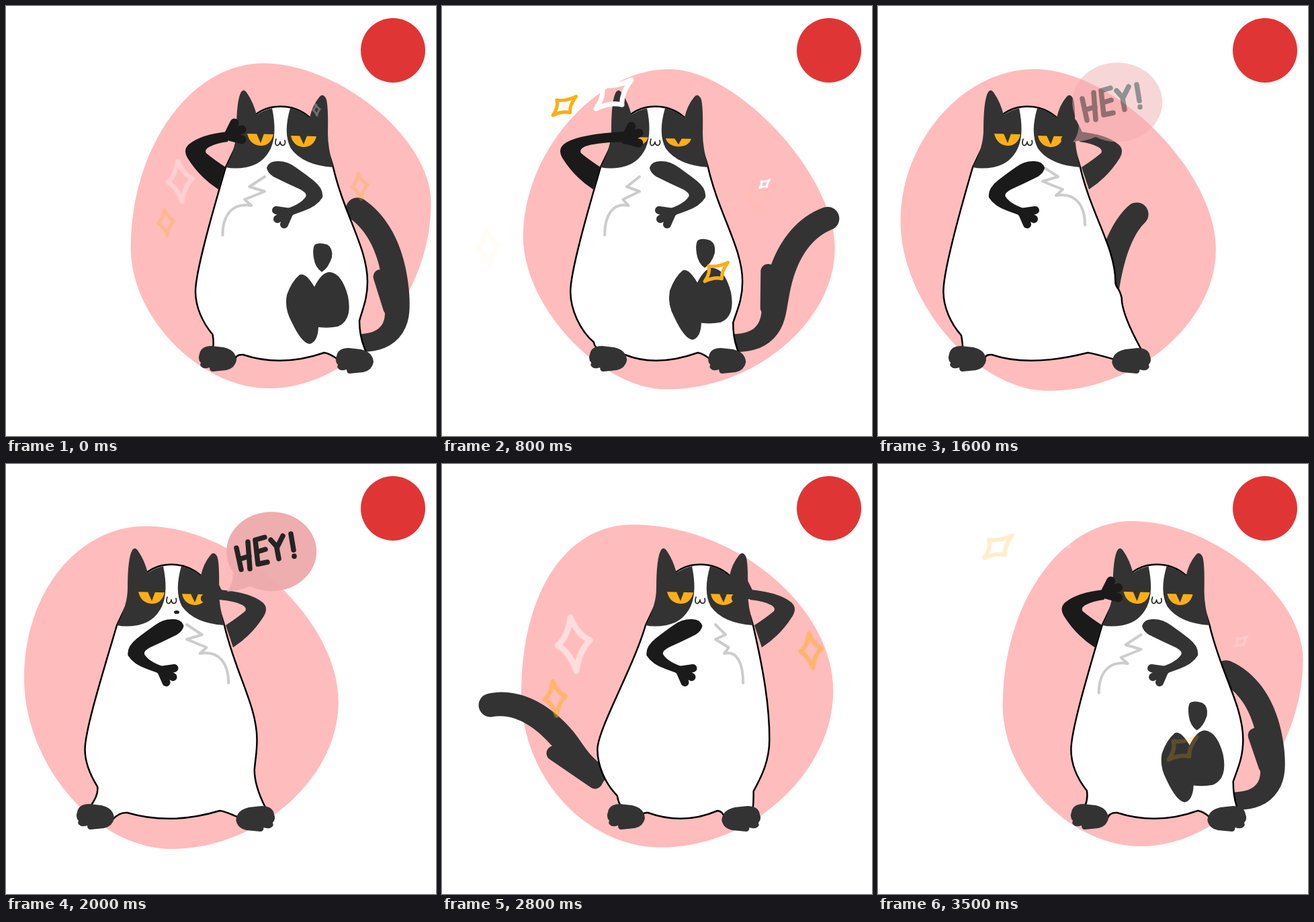
An HTML page for the animation above (3.6 s loop, 640 by 640 pixels).

```html
<!DOCTYPE html>
<html lang="en">
<head>
<meta charset="utf-8">
<title>Grooming cat</title>
<style>
  html, body { margin: 0; width: 100%; height: 100%; overflow: hidden; background: #fff; }
  svg { display: block; width: 100%; height: 100%; }
  .line { fill: none; stroke-linecap: round; stroke-linejoin: round; }
</style>
</head>
<body>
<svg viewBox="0 0 640 640">
  <defs><clipPath id="bodyClip"><path id="clipShape"/></clipPath></defs>
  <path id="blob" fill="#ffbcbd"/>
  <path id="tail" fill="#333"/>
  <path id="tuft" class="line" stroke="#333" stroke-width="22"/>
  <path id="body" fill="#fff" stroke="#000" stroke-width="2.5" stroke-linejoin="round"/>
  <g clip-path="url(#bodyClip)">
    <g id="spots" fill="#333">
      <path d="M459 356Q464 351 478 355Q487 360 485 374Q480 390 470 396Q460 389 458 375Q456 362 459 356Z"/>
      <path d="M437 400Q446 396 459 418Q470 396 482 396Q500 398 509 432Q516 468 494 477Q480 480 465 478Q464 500 452 503Q440 502 425 470Q414 450 418 430Q425 410 437 400Z"/>
    </g>
  </g>
  <g fill="#333">
    <path id="footL"/>
    <path id="footR"/>
  </g>
  <g id="head">
    <g fill="#333">
      <path d="M-81 240Q-65 210 -65 185Q-65 140 -58 128Q-54 122 -49 130Q-40 143 -35 162Q-22 154 -12 152Q-4 190 -14 212Q-25 235 -50 240Q-68 243 -81 240Z"/>
      <path d="M79 240Q71 210 71 190Q72 145 68 137Q63 129 58 136Q48 148 44 166Q32 156 15 152Q4 190 16 212Q34 237 79 240Z"/>
    </g>
    <g id="eyes">
      <path fill="#fbae17" d="M-49 190L-10 191Q-14 208 -29 208Q-45 207 -49 190ZM16 193L54 194Q50 210 34 210Q19 208 16 193Z"/>
      <path fill="#333" d="M-35 190H-24L-29 204ZM29 193H40L35 206Z"/>
    </g>
    <path class="line" stroke="#222" stroke-width="1.7" d="M-6 198C-10 210 -1 210 0 202C0 210 10 209 7 200"/>
    <ellipse id="talk" cx="8" cy="220.5" rx="4" ry="2.6" fill="#222"/>
  </g>
  <g id="limbs">
    <path id="fluff" class="line" stroke="#ccc" stroke-width="4"/>
    <g id="chestArm">
      <path stroke="none" d="M-15 241Q-12 231 0 231Q15 230 28 240Q45 252 55 260Q70 272 68 285Q60 298 40 305L18 313L10 303Q35 296 43 284Q46 279 35 273Q15 264 -5 254Q-14 248 -15 241Z"/>
      <path class="line" stroke-width="12" d="M20 307L-1 304M17 308L1 317M18 309L11 325"/>
    </g>
    <g id="headArm">
      <path id="sleeve" stroke="none"/>
      <path id="hand" class="line" stroke-width="13" d="M-78 194L-68 174M-76 190L-57 184M-76 194L-57 199"/>
    </g>
  </g>
  <g id="tall" class="line"></g>
  <g id="wide" class="line"></g>
  <g id="bubble" role="img" aria-label="HEY!">
    <path fill="#eeabad" d="M-57 30Q-57 48 -66 59Q-46 57 -32 51A67 59 0 1 0 -57 30Z"/>
    <path class="line" stroke="#1d1d1d" stroke-width="7.5" d="M-52 -6L-45 26M-35 -15L-32 25M-48 11L-33 6M-24 -18L-20 18L-6 15M-24 -18L-10 -22M-22 0L-9 -4M-1 -18L8 -8M17 -24L8 -6L11 10M29 -27L33 -3M34 6L34 6.5"/>
  </g>
  <circle cx="576" cy="66" r="48" fill="#e03535"/>
</svg>
<script>
const LOOP = 3600, STEP = 100;
const TURN = 1600, TURN_BACK = 3200;
const BLACK = '#1a1a1a', DARK = '#333', GOLD = '#fbae17';
const $ = id => document.getElementById(id);
const set = (id, attrs) => {
  for (const name in attrs) $(id).setAttribute(name, attrs[name]);
};

const mix = (a, b, k) => a + (b - a) * k;
const ramp = (t, a, b) => Math.max(0, Math.min(1, (t - a) / (b - a)));
const ease = (t, a, b) => { const u = ramp(t, a, b); return u * u * (3 - 2 * u); };
const easeOut = (t, a, b) => 1 - (1 - ramp(t, a, b)) ** 2;
const pulse = (t, peak, width) => Math.exp(-(((t - peak) / width) ** 2));

// Head position every 400 ms, joined by a closed Catmull-Rom curve.
const HEAD = [408, 368, 317, 253, 222, 246, 309, 384, 422];
function headX(t) {
  const i = Math.floor(t / 400), u = t / 400 - i;
  const [a, b, c, d] = [8, 0, 1, 2].map(k => HEAD[(i + k) % 9]);
  return b + .5 * u * (c - a + u * (2 * a - 5 * b + 4 * c - d + u * (3 * (b - c) + d - a)));
}
const lean = t => 30 * pulse(t, 1250, 200) - 28 * pulse(t, 2700, 450);
const bellyX = t => headX(t) - 126 + lean(t);
const footLeft = t => mix(286, 104, ease(t, 510, 1210) - ease(t, 2090, 3115));
const footRight = t => mix(490, 342, easeOut(t, 0, 2000) - ease(t, 2400, 3200));

// The blob rolls left and back: w is its position, v how it tumbles on the way.
function blobPath(t) {
  const low = 1885, high = 3550;
  const rising = t > low && t < high;
  const a = Math.PI * (rising ? (t - low) / (high - low) : 1 + ((t - high + LOOP) % LOOP) / (LOOP + low - high));
  const w = (1 - Math.cos(a)) / 2, v = -Math.sin(a), peak = w ** 4;
  const T = [mix(212, 381, w) + 26 * v, 93 - 8 * peak + 2 * v];
  const R = [mix(491, 632, w) + 10 * Math.abs(v), 357 - 66 * peak + 12 * v];
  const B = [mix(245, 391, w) + 3 * v, mix(573, 569, w)];
  const L = [mix(25, 186, w), mix(318, 360, w)];
  const toSide = (p, q, k) => `C${mix(p[0], q[0], k)} ${p[1]} ${q[0]} ${mix(q[1], p[1], k)} ${q}`;
  const toFlat = (p, q, k) => `C${p[0]} ${mix(p[1], q[1], k)} ${mix(q[0], p[0], k)} ${q[1]} ${q}`;
  return `M${T}${toSide(T, R, .46 - .05 * v)}${toFlat(R, B, .52)}`
    + `${toSide(B, L, .5 - .04 * v)}${toFlat(L, T, .55 - .05 * v)}Z`;
}

// Hips and seat follow from how far each foot stands from the belly.
function bodyPath(t) {
  const x = headX(t), b = bellyX(t), e = b + 256, fl = footLeft(t), fr = footRight(t);
  const dl = fl - b, dr = fr - e;
  const lx = b + 24 + .4 * dl, ly = 487 + .5 * dl;
  const rx = e + 12 + .5 * dr, ry = 430 - .8 * dr;
  const sl = fl + 69 - .55 * dl, sr = fr - 38 - .45 * dr;
  return `M${x - 81} 240Q${x - 62} 200 ${x - 50} 175Q${x - 30} 149.5 ${x} 149.5`
    + `Q${x + 26} 149.5 ${x + 44} 166Q${x + 65} 190 ${x + 79} 240`
    + `C${x + 95} 310 ${e} 360 ${e} 410`
    + `C${e} ${mix(410, ry, .45)} ${mix(rx, e, .4)} ${ry - 18} ${rx} ${ry}`
    + `Q${rx} ${ry + 25} ${fr + 46} 515L${fr + 4} 526`
    + `Q${sr + 8} 517 ${sr} 516Q${b + 128} 538 ${sl} 519`
    + `Q${sl - 12} 518 ${fl + 55} 529L${fl + 22} 509`
    + `Q${lx + 2} ${ly + 12} ${lx} ${ly}`
    + `C${mix(lx, b, .6)} ${ly - 18} ${b} ${mix(425, ly, .35)} ${b} 425`
    + `C${b} 395 ${x - 100} 305 ${x - 81} 240Z`;
}

// The tail grows from its root along a changing heading; the tip curls most.
function drawTail(t, turned) {
  const side = 1 - 2 * (ease(t, 1300, 2400) - ease(t, 2800, 3400)), m = (1 - side) / 2;
  const curl = -Math.cos(2 * Math.PI * (t - (t < TURN ? 800 : 2800)) / 1350);
  const N = 40, len = mix(252, 212, m) / N, nodes = [];
  let x = bellyX(t) + 128 + 116 * side, y = mix(502, 468, m);
  for (let i = 0; i <= N; i++) {
    const u = i / N;
    const degrees = mix(5, 32, m) + mix(83, 24, m) * ease(u, 0, .36) + curl * 70 * u ** 2.5;
    const a = degrees * Math.PI / 180;
    const dx = side * Math.cos(a), dy = -Math.sin(a), d = Math.hypot(dx, dy) || 1;
    nodes.push({ x, y, nx: dy / d, ny: -dx / d, w: 13.5 + 6 * ease(u, 0, .45) - 2 * u * u });
    x += dx * len;
    y += dy * len;
  }
  const edge = s => nodes.map(p => [p.x + s * p.nx * p.w, p.y + s * p.ny * p.w]);
  set('tail', { d: `M${edge(1).join('L')}A17.5 17.5 0 0 1 ${edge(-1).reverse().join('L')}Z` });

  const beside = (u, gap) => {
    const p = nodes[Math.round(u * N)];
    return [p.x + gap * p.nx, p.y + gap * p.ny];
  };
  const gap = turned ? 24 : 20;
  set('tuft', { d: `M${beside(mix(.54, .38, m), gap)}L${beside(mix(.34, .04, m), gap * .5)}` });
}

function fluffPath(progress, lift) {
  const k = 1 - .82 * progress ** 3;
  const at = (x, y) => `${-23 + (x + 23) * k} ${y - lift} `;
  return `M${at(-23, 254)}L${at(-46, 269)}L${at(-23, 276)}L${at(-53, 288)}L${at(-43, 297)}`
    + `C${at(-72, 292)}${at(-86, 312)}${at(-86, 341)}`;
}

const FOOT = 'M2 518Q4 506 20 506L38 508Q56 512 57 527Q55 539 42 542L22 544Q17 544 17 538Q8 541 5 537Q2 535 4 531Q-1 526 2 518Z';
set('footL', { d: FOOT });
set('footR', { d: FOOT });

function addStars(id, corners, stars) {
  $(id).innerHTML = stars.map(([x, y, size, color]) => {
    const p = corners.map(c => c.map(v => v * size));
    const sides = p.map((a, i) => {
      const b = p[(i + 1) % 4];
      return `Q${(a[0] + b[0]) * .29} ${(a[1] + b[1]) * .29} ${b}`;
    });
    return `<path d="M${p[0]}${sides.join('')}Z" transform="translate(${x} ${y})" stroke="${color}" stroke-width="${1.5 + 5.5 * size}"/>`;
  }).join('');
}
addStars('tall', [[-4, -31], [19, -4], [3, 32], [-19, 2]],
  [[-128, -36, 1, '#fff'], [-150, 28, .64, GOLD], [150, -28, .64, GOLD], [83, -146, .28, '#fff']]);
addStars('wide', [[27, -22], [13, 15], [-26, 21], [-17, -14]],
  [[-113, -123, .65, GOLD], [-40, -140, 1, '#fff'], [113, 124, .65, GOLD], [185, -7, .28, '#fff']]);

// Bursts swell while they drift, brighten and fade.
const TALL = [
  { start: 3510, length: 900, from: [395, 292], to: [268, 322] },
  { start: 2300, length: 600, from: [262, 348], to: [378, 306] }
];
const WIDE = [
  { start: 380, length: 840, from: [378, 259], to: [212, 285] },
  { start: 2850, length: 700, from: [260, 272], to: [320, 273] }
];
function drawBurst(id, bursts, t, size, growth) {
  const age = b => (t - b.start + LOOP) % LOOP / b.length;
  const burst = bursts.find(b => age(b) < 1);
  if (!burst) return set(id, { opacity: 0 });
  const u = age(burst), [x, y] = burst.from.map((v, i) => mix(v, burst.to[i], u));
  set(id, { transform: `translate(${x} ${y}) scale(${size + growth * u})`, opacity: Math.sin(Math.PI * u) });
}

function draw(t) {
  const x = headX(t), turned = t >= TURN && t < TURN_BACK;
  const progress = turned ? (t - TURN) / 1600 : (t + LOOP - TURN_BACK) % LOOP / 2000;

  set('blob', { d: blobPath(t) });
  drawTail(t, turned);

  const body = bodyPath(t), shift = bellyX(t) - 282;
  set('body', { d: body });
  set('clipShape', { d: body });
  set('spots', { transform: `translate(${.87 * shift} ${.07 * shift})`, visibility: turned ? 'hidden' : 'visible' });
  set('footL', { transform: `translate(${footLeft(t)})` });
  set('footR', { transform: t < TURN ? `translate(${footRight(t)} 3)` : `translate(${footRight(t) + 59} 3) scale(-1.03 1)` });

  const squint = 1 - .28 * pulse(t, 800, 250) - .14 * pulse(t, 2400, 250);
  set('head', { transform: `translate(${x})` });
  set('eyes', { transform: `translate(0 207) scale(1 ${squint}) translate(0 -207)` });
  set('talk', { visibility: t >= 1700 && t < 2300 ? 'visible' : 'hidden' });

  const reach = 33 * pulse(t, 800, 250) + 22 * pulse(t, 2360, 330);
  const chest = turned ? BLACK : DARK, raised = turned ? DARK : BLACK;
  set('limbs', { transform: `translate(${x}) scale(${turned ? -1 : 1} 1)` });
  set('fluff', { d: fluffPath(progress, turned ? 15 : 0) });
  set('chestArm', { transform: `translate(${30 * progress - 11})`, fill: chest, stroke: chest });
  set('headArm', { fill: raised, stroke: raised });
  set('sleeve', {
    d: `M${reach - 78} 187Q-118 191 -136 206Q-145 214 -138 226Q-120 255 -92 273L-81 240`
      + `Q-98 229 -110 219Q-113 214 -106 210Q-95 204 ${reach - 78} 202Z`
  });
  set('hand', { transform: `translate(${reach} ${reach * .15})` });

  drawBurst('tall', TALL, t, .92, .42);
  drawBurst('wide', WIDE, t, .75, .5);
  const drift = (t - 2000) / 400;
  set('bubble', {
    transform: `translate(${395 + 39 * drift} ${131 - 13 * drift})`,
    opacity: .97 * ease(t, 1500, 1700) * (1 - ramp(t, 2050, 2520))
  });
}

function tick() {
  draw(Math.floor(performance.now() % LOOP / STEP) * STEP);
  requestAnimationFrame(tick);
}
tick();
</script>
</body>
</html>
```
